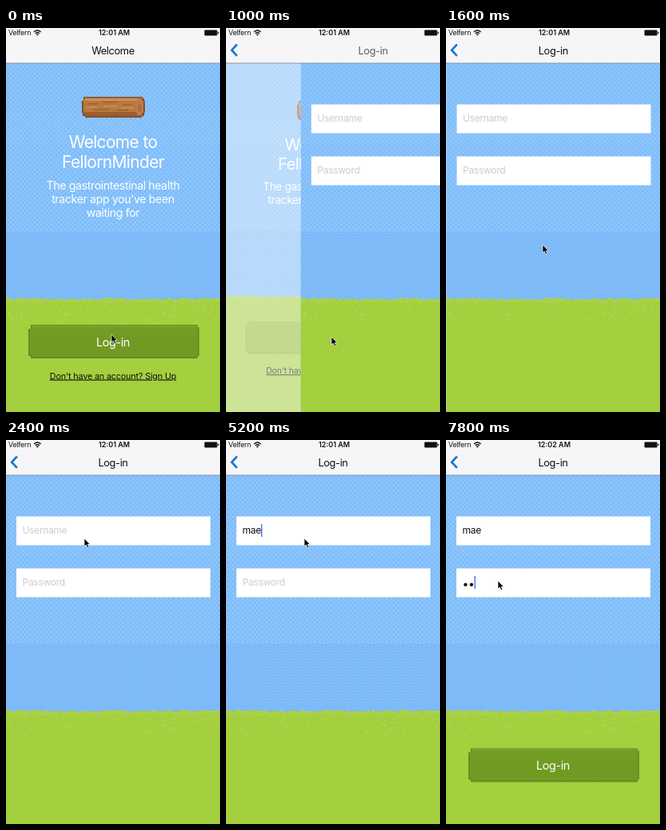
Recreate the animation shown at these times as an HTML page. Size 268 px wide and 480 px high, loop 8 s.

```html
<!DOCTYPE html>
<html lang="en">
<head>
<meta charset="utf-8">
<title>Log-in flow</title>
<style>
  html, body { margin: 0; width: 100%; height: 100%; overflow: hidden; background: #fff; }
  svg { display: block; width: 100vw; height: 100vh; }
  text { font-family: Inter, Roboto, sans-serif; letter-spacing: -.028em; white-space: pre; }
  .mid { text-anchor: middle; }
  .title { font-size: 12.8px; fill: #111; }
  .head { font-size: 21px; font-weight: 400; fill: #fff; letter-spacing: -.032em; }
  .body { font-size: 14.2px; font-weight: 400; fill: #fff; }
  .label { font-size: 14.4px; fill: #fff; }
  .link { font-size: 10.8px; fill: #111; text-decoration: underline; letter-spacing: -.015em; }
  .input { font-size: 12.1px; fill: #111; }
  .input.empty { fill: #cdcdd2; }
  .status { font-size: 8.9px; fill: #111; }
  .clock { font-size: 9px; font-weight: 600; letter-spacing: 0; }
</style>
</head>
<body>
<svg viewBox="0 0 268 480" preserveAspectRatio="none">
  <defs>
    <pattern id="lattice" width="6" height="6" patternUnits="userSpaceOnUse">
      <path d="M0 3L3 0L6 3L3 6Z" fill="none" stroke="#a6d6fd" stroke-width=".9"/>
    </pattern>
    <pattern id="dots" width="4" height="4" patternUnits="userSpaceOnUse">
      <path d="M0 0h1.500v1h-1.500zM2 2h1.500v1h-1.500z" fill="#a3d2fc"/>
    </pattern>
    <pattern id="weave" width="4" height="4" patternUnits="userSpaceOnUse">
      <path d="M0 0h1.300v1.300h-1.300zM2 2h1.300v1.300h-1.300z" fill="#628c1b"/>
    </pattern>

    <!-- reaches past the stage so that the shrinking screen leaves no gap -->
    <g id="meadow">
      <rect x="-20" y="0" width="308" height="520" fill="#7fbcfa"/>
      <rect x="-20" y="0" width="308" height="254" fill="url(#lattice)" opacity=".6"/>
      <rect x="-20" y="106" width="308" height="40" fill="url(#dots)" opacity=".4"/>
      <rect x="-20" y="254" width="308" height="86" fill="#78b6f8"/>
      <rect x="-20" y="254" width="308" height="86" fill="url(#dots)" opacity=".8"/>
      <rect x="-20" y="341" width="308" height="179" fill="#a4cf3f"/>
      <path id="blades" fill="#a9d146"/>
      <path id="specks" fill="#b4d850"/>
    </g>

    <g id="button">
      <path d="M28 376h3v-5h209v3h2v36h-2v3h-209v-3h-3z" fill="#648c20"/>
      <path d="M30 376h3v-4h206v3h1.500v33h-1.500v3h-206v-3h-3z" fill="#729c24"/>
      <path d="M33 372h206v2h-206z" fill="#7ba52b"/>
      <rect x="32" y="386" width="207" height="25" fill="url(#weave)" opacity=".6"/>
      <text class="label mid" x="134" y="397.500">Log-in</text>
    </g>

    <g id="log">
      <path d="M97 86h74v2h2v3h1v15h-1v4h-3v2h-71v-2h-3v-4h-1v-15h2z" fill="#85502a"/>
      <path d="M98 87.500h72v3h2v15h-2v4h-71v-3h-2v-16h1z" fill="#b87842"/>
      <path d="M99 88h66v3h-66z" fill="#cb8f58"/>
      <path d="M98 105h66v5h-65v-3h-1z" fill="#9c5d31"/>
      <path d="M102 94h14v1.500h-14zM122 92h18v1.500h-18zM146 95h12v1.500h-12zM110 101h20v1.500h-20zM138 102h15v1.500h-15z" fill="#a0622f"/>
      <path d="M100 98h14v1.500h-14zM122 97h18v1.500h-18zM144 99h16v1.500h-16z" fill="#cc9058"/>
      <path d="M165 89h5v3h2v14h-2v3h-5v-3h-2v-14h2z" fill="#bd7d46"/>
      <path d="M166 95h3v2h1v6h-1v2h-3v-2h-1v-6h1z" fill="#ad6d39"/>
    </g>
  </defs>

  <rect width="268" height="480" fill="#fff"/>

  <g id="welcome">
    <use href="#meadow"/>
    <use href="#log"/>
    <text class="head mid" x="134" y="150">Welcome to</text>
    <text class="head mid" x="134" y="175">FellornMinder</text>
    <text class="body mid" x="134" y="202">The gastrointestinal health</text>
    <text class="body mid" x="134" y="219">tracker app you've been</text>
    <text class="body mid" x="134" y="236">waiting for</text>
    <use id="enter" href="#button"/>
    <text class="link mid" x="134" y="438.500">Don't have an account? Sign Up</text>
  </g>

  <g id="login">
    <svg width="268" height="480"><use href="#meadow"/></svg>
    <rect x="13" y="95.500" width="243" height="36" fill="#fff"/>
    <rect x="13" y="160.500" width="243" height="36" fill="#fff"/>
    <text id="user" class="input" x="20.500" y="117"></text>
    <text id="pass" class="input" x="20.500" y="182"></text>
    <rect id="caret" width="1.400" height="16" fill="#4a6ff0"/>
    <use id="submit" href="#button" y="14.500"/>
  </g>

  <g id="bar">
    <rect width="268" height="44" fill="#f6f6f8"/>
    <rect y="43.500" width="268" height="1" fill="#8795ab"/>
    <text class="status" x="3" y="9">Velfern</text>
    <g fill="none" stroke="#111" stroke-width="1.300">
      <path d="M35 5q4.300-4 8.600 0M36.700 6.900q2.600-2.400 5.200 0"/>
    </g>
    <path d="M39.300 9.800l-1.500-1.700q1.500-1.200 3 0z" fill="#111"/>
    <text id="clock" class="status clock mid" x="135.500" y="9"></text>
    <rect x="248.500" y="2.500" width="16" height="7" rx="1" fill="#111"/>
    <rect x="265" y="4.700" width="1.300" height="2.600" fill="#111"/>
    <path id="back" d="M13.800 20.500L7.200 27.700L13.800 34.900" fill="none" stroke="#127ad2" stroke-width="2.700"/>
    <text id="titleA" class="title mid" y="33">Welcome</text>
    <text id="titleB" class="title mid" y="33">Log-in</text>
  </g>

  <path id="pointer" d="M0 0V10L2.300 8L4 11.800L5.800 11L4.200 7.400H7.200Z" fill="#000" stroke="#fff" stroke-width=".7"/>
</svg>

<script>
const LOOP = 8000, STEP = 200, WIDTH = 268;
const $ = id => document.getElementById(id);

// [time, progress of the slide to the log-in screen]
const slide = [[600, 0], [800, .134], [1000, .65], [1200, .935], [1400, .985], [1600, .998], [1800, 1]];
// [time, x, y] of the pointer tip
const pointer = [
  [0, 132, 383], [400, 132, 386], [1200, 132, 386], [1400, 130, 350], [1600, 121, 271],
  [1800, 106, 172], [2000, 98, 123], [5600, 98, 123], [6000, 74, 166], [6200, 65, 176]
];
const name = { text: 'mae', start: 4400, focus: 2600 };
const secret = { text: '••', start: 7600, focus: 6600 };

function at(table, t, col = 1) {
  const i = table.findIndex(row => row[0] > t);
  if (i === 0) return table[0][col];
  if (i < 0) return table[table.length - 1][col];
  const a = table[i - 1], b = table[i];
  return a[col] + (b[col] - a[col]) * (t - a[0]) / (b[0] - a[0]);
}

function growGrass() {
  let seed = 11;
  const rnd = () => (seed = seed * 16807 % 2147483647) / 2147483647;
  let blades = '', specks = '';
  for (let x = -20; x < WIDTH + 20; x += 2) {
    const top = 337 + Math.floor(rnd() * 4);
    blades += `M${x} ${top}h2V343h-2z`;
  }
  for (let i = 0; i < 150; i++) {
    const y = 342 + Math.floor(26 * rnd() ** 1.4);
    specks += `M${Math.floor(rnd() * WIDTH)} ${y}h2v1.3h-2z`;
  }
  $('blades').setAttribute('d', blades);
  $('specks').setAttribute('d', specks);
}

const typed = (field, t) =>
  field.text.slice(0, Math.max(0, Math.floor((t - field.start) / STEP) + 1));

function fill(el, value, hint) {
  const text = value || hint;
  if (el.textContent !== text) el.textContent = text;
  el.classList.toggle('empty', !value);
}

function show(id, on) { $(id).style.display = on ? '' : 'none'; }

function drawCaret(t, user, pass) {
  const inPass = t >= secret.focus;
  const value = inPass ? pass : user;
  const el = $(inPass ? 'pass' : 'user');
  const x = 20.5 + (value ? el.getComputedTextLength() : -.4);
  $('caret').setAttribute('x', x);
  $('caret').setAttribute('y', inPass ? 170 : 105);
  show('caret', t >= name.focus && (t % 1000 < 600 || t >= secret.start));
}

function draw(t) {
  const p = at(slide, t);
  const scale = 1 - .05 * p;
  $('welcome').setAttribute('transform',
    `translate(${134 - 11 * p} 240) scale(${scale}) translate(-134 -240)`);
  $('welcome').setAttribute('opacity', 1 - .7 * p);
  $('enter').setAttribute('opacity', t >= 400 ? .38 : 1);
  show('welcome', p < 1);

  $('login').setAttribute('transform', `translate(${WIDTH * (1 - p)} 0)`);
  show('login', p > 0);

  $('titleA').setAttribute('x', 134 - 157 * p);
  $('titleA').setAttribute('opacity', Math.max(0, 1 - 1.8 * p));
  $('titleB').setAttribute('x', 134 + 143 * (1 - p));
  $('titleB').setAttribute('opacity', p);
  $('back').setAttribute('opacity', Math.min(1, p * 8));
  $('clock').textContent = t < 6400 ? '12:01 AM' : '12:02 AM';

  const user = typed(name, t), pass = typed(secret, t);
  fill($('user'), user, 'Username');
  fill($('pass'), pass, 'Password');
  $('pass').style.fontSize = pass ? '14px' : '';
  $('pass').setAttribute('y', pass ? 185 : 182);
  drawCaret(t, user, pass);
  show('submit', pass);

  $('pointer').setAttribute('transform',
    `translate(${at(pointer, t)} ${at(pointer, t, 2)})`);
}

function tick(now) {
  draw(Math.floor(now % LOOP / STEP) * STEP);
  requestAnimationFrame(tick);
}

growGrass();
draw(0);
requestAnimationFrame(tick);
</script>
</body>
</html>
```
